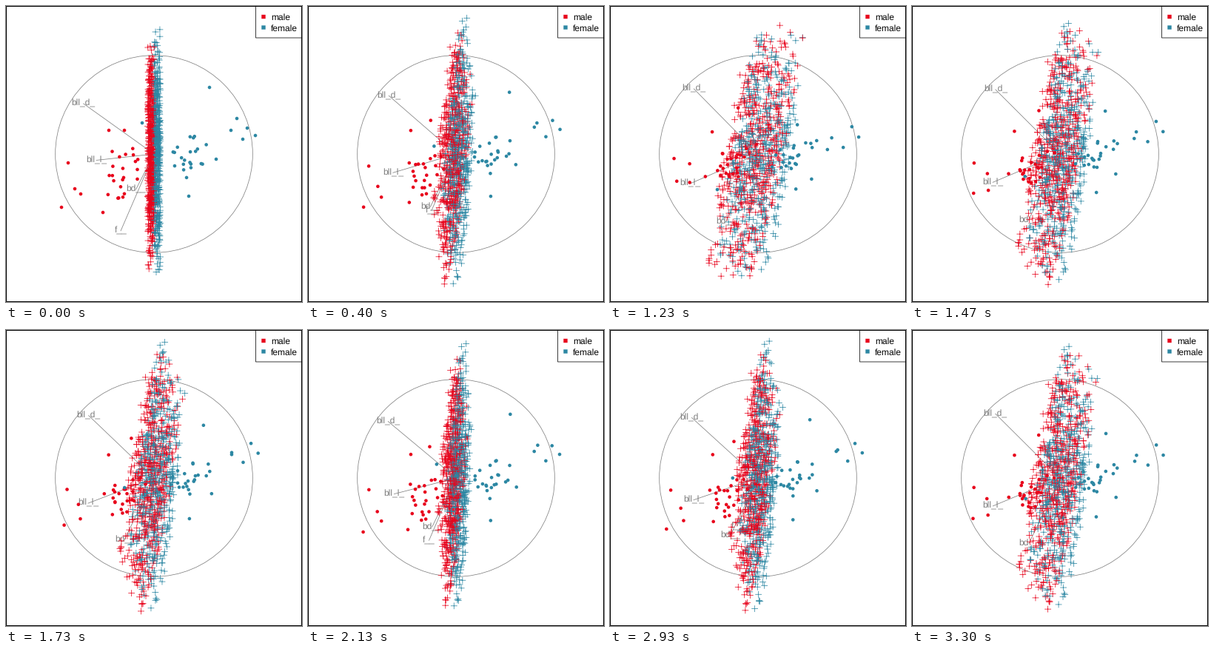
A matplotlib script that plays this animation: 400 by 400 pixels, repeating every 3.33 s.

```python
import numpy as np
import matplotlib.pyplot as plt
from matplotlib.animation import FuncAnimation
from matplotlib.patches import Circle, Rectangle

plt.rcParams["text.hinting"] = "none"

RED, TEAL, GREY = "#e8041c", "#2c87a3", "#7f7f7f"
SIZE, MID, UNIT = 400, 200, 400 / 3
PX = 0.72  # points per pixel at 100 dpi
THIN = 0.75 * PX
FRAMES, HALF = 100, 36  # frames in a loop, frames of one sweep
FONT = dict(family="Liberation Sans", fontsize=12 * PX, va="baseline")
rng = np.random.default_rng(4)

# Axis ends in pixels from the centre, y pointing down
NAMES = ["bll_d_", "bll_l_", "bd__", "f__"]
col_x = np.array([-95.5, -78, -24.5, -45])
col_y = np.array([-69, 8, 48, 104])
col_x = col_x / np.linalg.norm(col_x)
col_y = col_y - col_x * (col_x @ col_y)
col_y = col_y / np.linalg.norm(col_y)
basis = np.column_stack([col_x, col_y])

# The radial tour rotates the last variable out of the plane
reach = np.linalg.norm(basis[3])
u = basis[3] / reach
phi0 = np.arcsin(reach)
normal = (np.eye(4)[3] - reach * (basis @ u)) / np.cos(phi0)


def angle(i):
    return phi0 * (1 - abs(1 - i % (2 * HALF) / HALF))


def turn(flat, depth, delta):
    """Move points along u as the plane turns by delta."""
    shift = (np.cos(delta) - 1) * (flat @ u) - np.sin(delta) * depth
    return MID + UNIT * (flat + np.outer(shift, u))


def group(outer, low, high, count):
    """Key points on the rim plus a random core: x, y and y after the sweep."""
    return np.vstack([outer, rng.uniform(low, high, (count, 3))])


male = group([(84, 212, 207), (93, 247, 215), (101, 254, 240), (75, 272, 239),
              (139, 168, 170), (160, 168, 138), (131, 279, 217)],
             (136, 178, 182), (180, 262, 232), 22)
female = group([(275, 110, 158), (312, 152, 192), (326, 165, 162), (337, 175, 176),
                (320, 180, 190), (304, 168, 177), (284, 207, 233), (247, 257, 248),
                (184, 158, 246)],
               (222, 172, 182), (275, 238, 222), 21)
data = np.vstack([male, female])
dots = (data[:, :2] - MID) / UNIT
far = angle(HALF - 1)
move = (data[:, 2] - data[:, 1]) / UNIT / u[1]
dots_depth = ((np.cos(far) - 1) * (dots @ u) - move) / np.sin(far)

# Crosses: a thin slab of a four-dimensional box around the boundary
cloud = rng.uniform(-1, 1, (10000, 4)) * (0.86, 0.81, 0.9, 0.76)
cloud = cloud[np.abs(cloud @ col_x) < 0.064]
cross = cloud @ basis
cross_depth = cloud @ normal

fig = plt.figure(figsize=(4, 4), dpi=100, facecolor="white")
ax = fig.add_axes([0, 0, 1, 1])
ax.set(xlim=(0, SIZE), ylim=(SIZE, 0))
ax.axis("off")


def box(x, y, w, h, **style):
    ax.add_patch(Rectangle((x, y), w, h, snap=False, **style))


ax.add_patch(Circle((MID, MID), UNIT, fill=False, ec=GREY, lw=THIN, zorder=1))
spokes = [ax.plot([], [], color=GREY, lw=THIN, zorder=1)[0] for _ in NAMES]
labels = [ax.text(0, 0, name, color=GREY, ha="center", zorder=2, **FONT)
          for name in NAMES]

crosses = ax.scatter(*cross.T, marker="+", s=(8.8 * PX) ** 2, linewidths=THIN,
                     c=np.where(cross[:, 0] < 0, RED, TEAL), snap=False, zorder=3)
points = ax.scatter(*dots.T, s=(4.6 * PX) ** 2, linewidths=0, snap=False, zorder=4,
                    c=[RED] * len(male) + [TEAL] * len(female))

box(337.5, 0.5, 62, 42.5, fc="white", ec="black", lw=THIN, zorder=5)
for y, color, name in [(14.5, RED, "male"), (29, TEAL, "female")]:
    box(345.3, y - 2.7, 5.4, 5.4, fc=color, lw=0, zorder=6)
    ax.text(358, y + 4.5, name, color="black", zorder=6, **FONT)
box(0.5, 0.5, SIZE - 1, SIZE - 1, fill=False, ec="black", lw=PX, zorder=7)


def update(i):
    delta = angle(i)
    for spoke, label, (x, y) in zip(spokes, labels, turn(basis, normal, delta)):
        spoke.set_data([MID, x], [MID, y])
        label.set_position((x, y + 3))
    crosses.set_offsets(turn(cross, cross_depth, delta))
    points.set_offsets(turn(dots, dots_depth, delta))
    return [*spokes, *labels, crosses, points]


anim = FuncAnimation(fig, update, frames=FRAMES, interval=33.3, repeat=True,
                     repeat_delay=0, blit=False)
plt.show()
```
